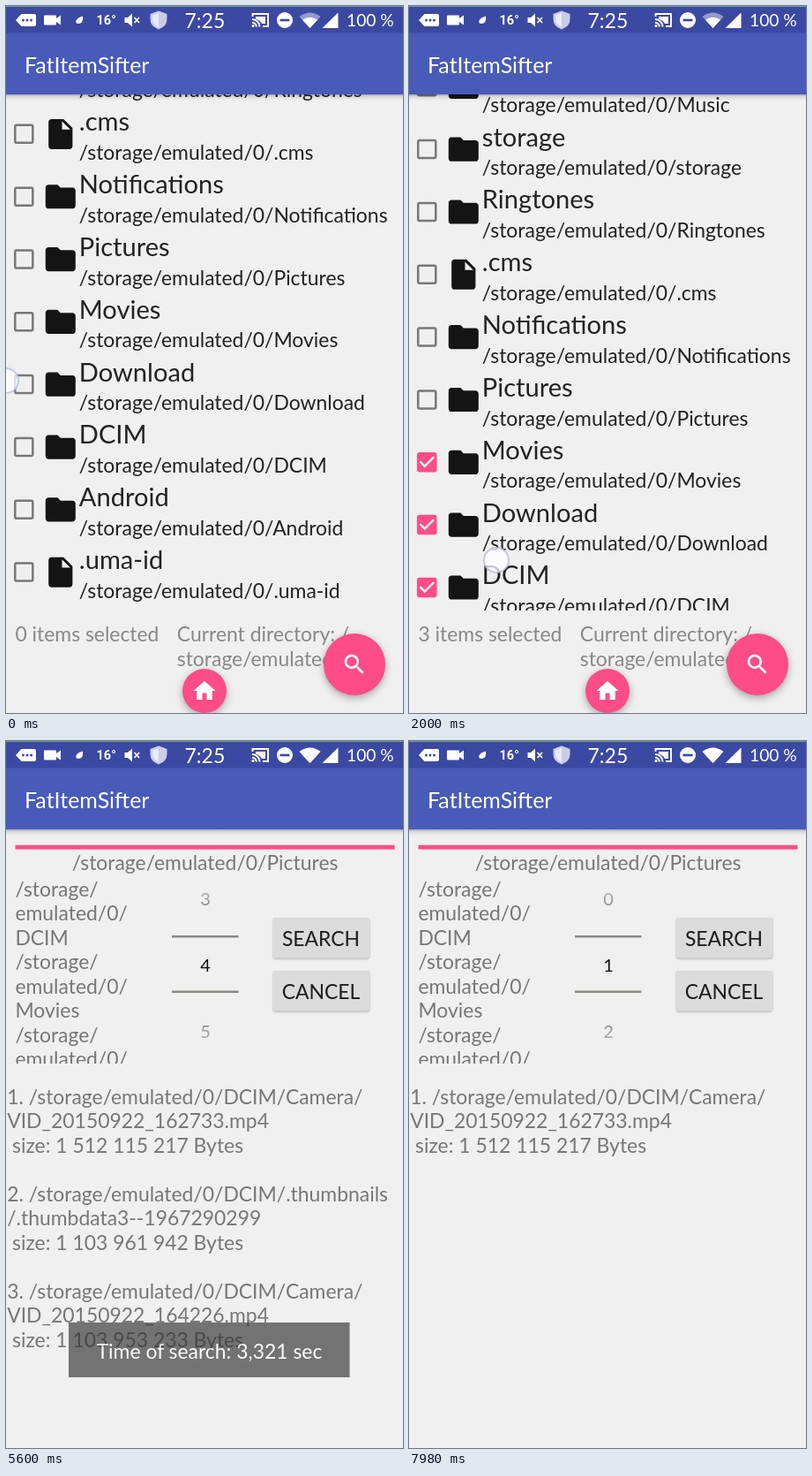
These frames come from a looping animation (450 by 800 pixels, 8 s). An HTML page:

```html
<!DOCTYPE html>
<html lang="en">
<head>
<meta charset="utf-8">
<title>FatItemSifter</title>
<style>
  html, body { margin: 0; width: 100%; height: 100%; overflow: hidden; background: #f0f0f0; }
  svg { display: block; }
  #stage { width: 450px; height: 800px; font: 22.92px Lato, Carlito, sans-serif; }
  text { white-space: pre; }
  .name { font-size: 29.1px; fill: #222; }
  .path { fill: #222; }
  .grey { fill: #777; }
  .foot { fill: #888; }
  .title { font-size: 25px; fill: #fff; }
  .digit { font-size: 20px; fill: #111; text-anchor: middle; }
  .btn { fill: #1c1c1c; text-anchor: middle; }
  .mid { text-anchor: middle; }
  .fab { filter: drop-shadow(0 3px 4px rgba(0, 0, 0, .32)); }
  .raised { filter: drop-shadow(0 1.5px 1.2px rgba(0, 0, 0, .28)); }
</style>
</head>
<body>
<svg id="stage" viewBox="0 0 450 800">
  <defs>
    <linearGradient id="shade" x2="0" y2="1">
      <stop stop-opacity=".3"/><stop offset=".35" stop-opacity=".1"/><stop offset="1" stop-opacity="0"/>
    </linearGradient>
    <linearGradient id="fade" gradientUnits="userSpaceOnUse" x1="0" y1="141" x2="0" y2="367">
      <stop stop-color="#000"/><stop offset=".45" stop-color="#fff"/>
      <stop offset=".55" stop-color="#fff"/><stop offset="1" stop-color="#000"/>
    </linearGradient>
    <mask id="wheel" maskUnits="userSpaceOnUse" x="180" y="141" width="92" height="226" style="mask-type:luminance">
      <rect x="180" y="141" width="92" height="226" fill="url(#fade)"/>
    </mask>
    <clipPath id="listClip"><rect y="100" width="450" height="584"/></clipPath>
    <clipPath id="pathsClip"><rect y="150" width="180" height="215"/></clipPath>
    <path id="folder" d="M10 4H4c-1.1 0-2 .9-2 2v12c0 1.1.9 2 2 2h16c1.1 0 2-.9 2-2V8c0-1.1-.9-2-2-2h-8z"/>
    <path id="file" d="M6 2c-1.1 0-2 .9-2 2v16c0 1.1.9 2 2 2h12c1.1 0 2-.9 2-2V8l-6-6zm7 7V3.5L18.5 9z"/>
    <path id="box" d="M19 5v14H5V5zm0-2H5c-1.1 0-2 .9-2 2v14c0 1.1.9 2 2 2h14c1.1 0 2-.9 2-2V5c0-1.1-.9-2-2-2z"/>
    <path id="tick" d="M19 3H5c-1.1 0-2 .9-2 2v14c0 1.1.9 2 2 2h14c1.1 0 2-.9 2-2V5c0-1.1-.9-2-2-2zm-9 14l-5-5 1.4-1.4L10 14.2l7.6-7.6L19 8z"/>
    <g id="bar">
      <rect y="30" width="450" height="70" fill="#485bb9"/>
      <rect y="100" width="450" height="7" fill="url(#shade)"/>
      <text class="title" x="21" y="75.5">FatItemSifter</text>
    </g>
  </defs>

  <rect width="450" height="800" fill="#f0f0f0"/>

  <g id="browse">
    <g clip-path="url(#listClip)"><g id="rows"></g></g>
    <text class="foot" id="count" x="10.4" y="719"></text>
    <text class="foot" x="193.8" y="719">Current directory: /</text>
    <text class="foot" x="193.8" y="746.5">storage/emulated/0</text>
    <g class="fab" fill="#fd4c87">
      <circle cx="395" cy="745" r="35"/>
      <circle cx="225" cy="775" r="25"/>
    </g>
    <g fill="#fff">
      <path transform="translate(380 730) scale(1.25)" d="M15.5 14h-.8l-.3-.3A6.5 6.5 0 1 0 13.7 14.4l.3.3v.8l5 5 1.5-1.5zm-6 0a4.5 4.5 0 1 1 0-9 4.5 4.5 0 0 1 0 9z"/>
      <path transform="translate(210 760) scale(1.25)" d="M10 20v-6h4v6h5v-8h3L12 3 2 12h3v8z"/>
    </g>
    <g id="ripples"></g>
    <use href="#bar"/>
  </g>

  <g id="search">
    <rect y="30" width="450" height="830" fill="#f0f0f0"/>
    <rect id="progress" x="10.5" y="117.8" width="430" height="4.8"/>
    <text class="grey mid" id="current" x="225.6" y="146">/storage/emulated/0/Pictures</text>
    <g class="grey" id="paths" clip-path="url(#pathsClip)"></g>
    <g mask="url(#wheel)"><g id="digits"></g></g>
    <path d="M188 221.3h75.5M188 283.8h75.5" stroke="#898984" stroke-width="2.4"/>
    <rect class="raised" id="go" x="303" y="200" width="109" height="45.5" rx="2" fill="#dbdbdb"/>
    <rect class="raised" x="303" y="260" width="109" height="45.5" rx="2" fill="#dbdbdb"/>
    <text class="btn" x="357" y="232">SEARCH</text>
    <text class="btn" x="357" y="292">CANCEL</text>
    <g class="grey" id="results"></g>
    <use href="#bar"/>
    <g id="toast">
      <rect x="71" y="658" width="318.5" height="62" fill="#323232" fill-opacity=".88"/>
      <text class="mid" id="took" x="230.5" y="699" fill="#fff"></text>
    </g>
  </g>

  <g id="status" fill="#fff">
    <rect width="450" height="30.5" fill="#3b49a2"/>
    <rect width="450" height="1" fill="#6fa39c"/>
    <path d="M17.5 9H32q2 0 2 2v10q0 2-2 2H17.5L11 16z"/>
    <g fill="#3b49a2"><circle cx="19.5" cy="16" r="1.5"/><circle cx="24" cy="16" r="1.5"/><circle cx="28.5" cy="16" r="1.5"/></g>
    <path d="M44 10.5h12q1 0 1 1v2.5l5-3.5v11l-5-3.5v2.5q0 1-1 1H44q-1 0-1-1v-9q0-1 1-1z"/>
    <path d="M87 11.5q1 8-4.5 8.5-4 0-3-3.5 1.5-3.5 7.5-5z"/>
    <text x="102.5" y="21" style="font:700 14.5px Roboto,sans-serif">16°</text>
    <path d="M134.5 13h3.5l5-4.5v15l-5-4.5h-3.5z"/>
    <path d="M145.5 13l5.5 6m0-6l-5.5 6" stroke="#fff" stroke-width="1.7"/>
    <path d="M173 5.5l9.5 3.5v6q0 8-9.5 11.5-9.5-3.5-9.5-11.5V9z" fill="#c9cee8"/>
    <path d="M173 8v16q-7-3-7-9v-4.5z" fill="#e9ecf7"/>
    <text x="202.5" y="25" font-size="23">7:25</text>
    <path d="M279.5 12V9H297v14h-6M279 15a8.5 8.5 0 0 1 8.5 8.5M279 18.7a4.8 4.8 0 0 1 4.8 4.8" fill="none" stroke="#fff" stroke-width="1.9"/>
    <path d="M283 12h11v8h-4q-2-4-7-5.5z"/>
    <circle cx="280" cy="22.5" r="1.5"/>
    <circle cx="316" cy="16" r="9"/>
    <rect x="310.5" y="14.7" width="11" height="2.6" fill="#3b49a2"/>
    <path id="wifi" d="M332.5 12q12-9 24 0L344.5 25z"/>
    <path d="M336 15.8q8.5-6 17 0L344.5 25z"/>
    <path d="M376.5 7.5v17.5h-18z"/>
    <text x="386" y="23" font-size="19.2">100 %</text>
  </g>

  <circle id="touch" r="14" fill="#fff" fill-opacity=".75" stroke="#b4bde6" stroke-opacity=".8" stroke-width="2"/>
</svg>

<script>
const LOOP = 8000, PITCH = 70.83, STEP = 27.5, PINK = '#fd4c87';
const $ = id => document.getElementById(id);
const clamp = v => Math.min(1, Math.max(0, v));
const ramp = (t, a, b) => clamp((t - a) / (b - a));
const smooth = p => p * p * (3 - 2 * p);
const ease = (t, a, b) => smooth(ramp(t, a, b));
const mix = (a, b, p) => a + (b - a) * p;

// Rows from the top; ".cms" sits at 131 before scrolling.
const names = ['Music', 'storage', 'Ringtones', '.cms', 'Notifications', 'Pictures',
  'Movies', 'Download', 'DCIM', 'Android', '.uma-id'];
const checkedAt = { Download: 100, Movies: 380, DCIM: 660 };

$('rows').innerHTML = names.map((n, i) => {
  const icon = n[0] === '.' ? 'file' : 'folder';
  const place = 'transform="translate(5.3 -1.2) scale(1.25)"';
  const check = n in checkedAt ? `<use href="#tick" id="tick${n}" fill="${PINK}" ${place}/>` : '';
  return `<g transform="translate(0 ${131 + (i - 3) * PITCH})">
    <use href="#box" id="box${n}" fill="#777" ${place}/>${check}
    <use href="#${icon}" fill="#141414" transform="translate(41.4 -6.5) scale(1.7)"/>
    <text class="name" x="82.8" y="10.3">${n}</text>
    <text class="path" x="82.8" y="43">/storage/emulated/0/${n}</text></g>`;
}).join('');

const lines = (list, x, y) => list.map((s, i) => `<text x="${x}" y="${y + i * STEP}">${s}</text>`).join('');
$('paths').innerHTML = lines(['DCIM', 'Movies', 'Download']
  .flatMap(n => ['/storage/', 'emulated/0/', n]), 10.4, 175.5);

const found = [
  ['1. /storage/emulated/0/DCIM/Camera/', 'VID_20150922_162733.mp4', ' size: 1 512 115 217 Bytes'],
  ['2. /storage/emulated/0/DCIM/.thumbnails', '/.thumbdata3--1967290299', ' size: 1 103 961 942 Bytes'],
  ['3. /storage/emulated/0/DCIM/Camera/', 'VID_20150922_164226.mp4', ' size: 1 103 953 233 Bytes']
];
$('results').innerHTML = found.map((f, i) => `<g>${lines(f, 1.2, 410.5 + i * 4 * STEP)}</g>`).join('');
$('digits').innerHTML = [0, 1, 2, 3, 4, 5, 6]
  .map(n => `<text class="digit" x="226" y="${261 + n * 75}">${n}</text>`).join('');

// start, end, from x, y, to x, y
const touches = [
  [0, 100, 0, 424, 2, 425],
  [300, 380, 12, 355, 13, 356],
  [580, 660, 12, 497, 13, 498],
  [1180, 2010, 100, 468, 99, 627],
  [2180, 2260, 394, 744, 394, 744],
  [3140, 3540, 200, 352, 178, 189],
  [3880, 3980, 350, 225, 351, 225],
  [5860, 6220, 185, 180, 200, 350],
  [6380, 6480, 351, 225, 351, 225]
];

// start, x, y, radius, colour
const ripples = [
  [20, 20.5, 428, 26, PINK], [300, 20.5, 357, 26, PINK],
  [560, 20.5, 498, 26, PINK], [2180, 395, 745, 35, '#fff']
];
$('ripples').innerHTML = ripples.map(([, x, y, , c]) => `<circle cx="${x}" cy="${y}" fill="${c}"/>`).join('');

const show = (el, on) => el.setAttribute('opacity', +on);
const move = (id, y) => $(id).setAttribute('transform', `translate(0 ${y})`);
const write = (id, s) => { if ($(id).textContent !== s) $(id).textContent = s; };

function drawTouch(t) {
  const k = touches.find(([a, b]) => t >= a && t < b + 60);
  show($('touch'), k ? 1 - ramp(t, k[1], k[1] + 60) : 0);
  if (!k) return;
  const p = ease(t, k[0], k[1]);
  $('touch').setAttribute('cx', mix(k[2], k[4], p));
  $('touch').setAttribute('cy', mix(k[3], k[5], p));
}

function drawBrowse(t) {
  move('rows', 159 * ease(t, 1180, 2010));
  let n = 0;
  for (const [name, at] of Object.entries(checkedAt)) {
    const p = ramp(t, at, at + 100);
    show($('tick' + name), p);
    show($('box' + name), 1 - p);
    n += t >= at;
  }
  write('count', `${n} items selected`);
  ripples.forEach(([at, , , r], i) => {
    const c = $('ripples').children[i], p = ramp(t, at, at + 300);
    c.setAttribute('r', r * Math.min(1, p * 2));
    show(c, .25 * (1 - p));
  });
}

function wheelAt(t) {
  if (t < 5860) return 1 + 2.337 * ease(t, 3140, 3540) + .663 * ease(t, 3540, 3880);
  return 4 - 2.4 * ease(t, 5860, 6220) - .6 * ease(t, 6220, 6400);
}

function toastAt(t, shown, hidden) {
  const out = ramp(t, hidden, hidden + 160);
  return ramp(t, shown, shown + 180) * (1 - out * out);
}

function drawSearch(t) {
  const open = ramp(t, 2460, 2640);
  show($('search'), open);
  move('search', 64 * (1 - open) ** 2);
  move('digits', -75 * wheelAt(t));

  const press = (a, b) => ramp(t, a, a + 60) * (1 - ramp(t, b, b + 100));
  const shade = Math.round(219 - 22 * (press(3880, 4000) + press(6380, 6450)));
  $('go').setAttribute('fill', `rgb(${shade},${shade},${shade})`);

  const busy = t >= 4740 && t < 6480 || t >= 7100;
  $('progress').setAttribute('fill', busy ? PINK : '#cccdd7');
  show($('current'), t >= 4740);

  const hits = t >= 7100 ? 1 : t >= 4880 && t < 6480 ? 3 : 0;
  [...$('results').children].forEach((g, i) => show(g, i < hits));
  const again = t >= 7000;
  write('took', `Time of search: ${again ? '2,618' : '3,321'} sec`);
  show($('toast'), again ? toastAt(t, 7200, 7820) : toastAt(t, 4880, 5520));
}

const start = performance.now();
function frame() {
  const t = (performance.now() - start) % LOOP;
  drawBrowse(t);
  drawSearch(t);
  drawTouch(t);
  show($('wifi'), t < 4500 ? .45 : 1);
  requestAnimationFrame(frame);
}
frame();
</script>
</body>
</html>
```
